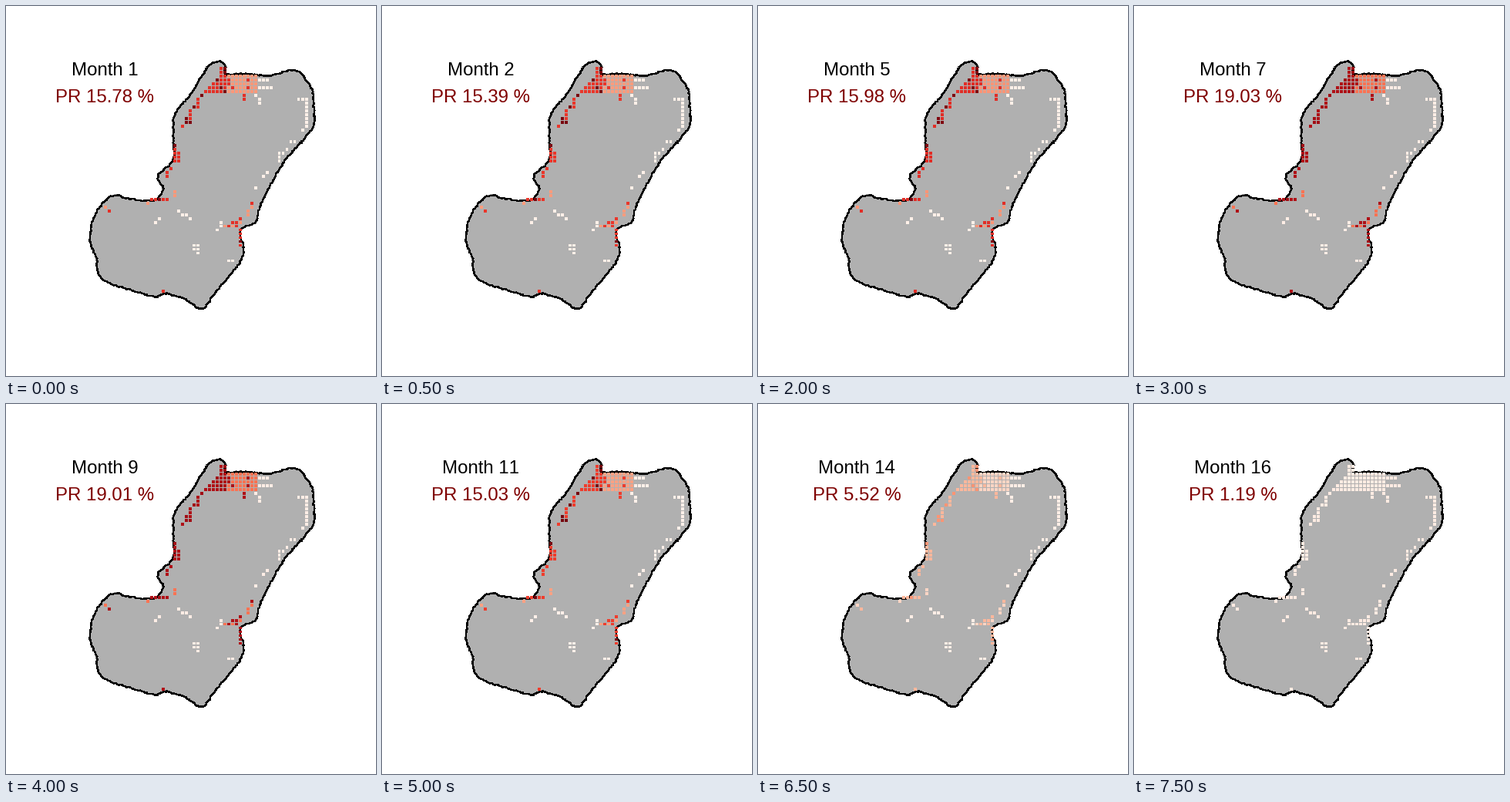
A matplotlib script that plays this animation: 480 px wide and 480 px high, repeating every 8 s.

```python
import numpy as np
import matplotlib.pyplot as plt
from matplotlib.animation import FuncAnimation
from matplotlib.collections import PolyCollection

SIZE, DPI = 480, 100
MONTHS = 16
PX = 72 / DPI  # points per pixel
SEVERE, HIGH, MEDIUM, LOW = range(4)

plt.rcParams["font.family"] = "Liberation Sans"
plt.rcParams["text.kerning_factor"] = 6  # even digit spacing

# Key points of the coast, clockwise from the northern tip
COAST = [(275, 72), (284, 78), (285, 88), (303, 88), (322, 89), (345, 90),
         (372, 83), (386, 91), (397, 109), (399, 130), (399, 154),
         (385, 174), (360, 203), (342, 234), (328, 264), (325, 279),
         (304, 291), (308, 313), (303, 333), (272, 371), (254, 393),
         (232, 380), (207, 373), (194, 377), (166, 370), (124, 354),
         (117, 325), (109, 305), (114, 274), (130, 251), (143, 246),
         (160, 250), (192, 252), (204, 237), (197, 221), (217, 199),
         (217, 168), (219, 140), (240, 114), (262, 79)]

# Inhabited trails on the (column, row) grid
TRAILS = {
    HIGH: [[(25, 7), (23, 10), (20, 15)], [(24, 8), (24, 10)],
           [(22, 11), (22, 14)], [(18, 20), (18, 24)], [(19, 22), (19, 24)],
           [(17, 26), (16, 28)], [(13, 34), (16, 34)], [(32, 41), (35, 39)],
           [(35, 42), (35, 46)]],
    MEDIUM: [[(31, 41), (34, 41)], [(33, 40), (35, 40)], [(11, 35), (12, 34)],
             [(18, 32), (18, 33)], [(36, 7), (36, 8)], [(0, 36), (1, 37)],
             [(38, 35), (37, 38)], [(15, 58)]],
    LOW: [[(40, 3), (42, 3)], [(40, 5), (43, 5)], [(39, 7), (40, 9)],
          [(50, 8), (52, 8), (52, 14), (51, 16)], [(49, 19), (48, 19)],
          [(47, 21), (45, 22), (45, 24)], [(42, 27), (41, 28)], [(39, 31)],
          [(19, 37), (22, 39)], [(13, 40), (14, 39)], [(29, 42), (30, 40)],
          [(23, 46), (23, 47)], [(24, 46), (24, 48)], [(32, 50), (33, 50)]],
}

# Prevalence at key months, and colour-map position of each group by prevalence
KEY_MONTHS = [1, 4, 7, 9, 11, 13, 16]
KEY_RATES = [15.78, 14.65, 19.03, 19.01, 15.03, 11.89, 1.19]
RATE_STOPS = [1.2, 12, 15, 19]
SHADES = {SEVERE: [.06, .83, .97, .88], HIGH: [.06, .57, .62, .84],
          MEDIUM: [.06, .32, .33, .47], LOW: [.06, .02, .03, .05]}

rng = np.random.default_rng(4)


def coastline():
    """Catmull-Rom curve through the key points, roughened."""
    p1 = np.array(COAST, float)
    p0, p2, p3 = (np.roll(p1, -k, axis=0) for k in (-1, 1, 2))
    parts = []
    for a, b, c, d in zip(p0, p1, p2, p3):
        t = np.arange(0, 1, 2 / np.hypot(*(c - b)))[:, None]
        parts.append(b + t / 2 * (c - a + t * (2 * a - 5 * b + 4 * c - d
                                               + t * (3 * b - a - 3 * c + d))))
    line = np.vstack(parts)
    return line + rng.uniform(-0.9, 0.9, line.shape)


def trail_cells(points):
    yield points[0]
    for a, b in zip(np.array(points), np.array(points[1:])):
        n = np.abs(b - a).max()
        for k in range(1, n + 1):
            yield tuple(np.rint(a + (b - a) * k / n).astype(int))


def settle():
    """Map each inhabited cell to its risk group."""
    groups = {}
    for row in range(7):  # dense northern town
        for col in range(min(30, 32 - row), 32 if row < 2 else 40):
            groups[col, row] = HIGH if col < 32 else MEDIUM
    for group, trails in TRAILS.items():
        for trail in trails:
            for cell in trail_cells(trail):
                groups.setdefault(cell, group)
    for cell, group in groups.items():  # some cells fare worse
        if group in (HIGH, MEDIUM) and rng.random() < 0.2:
            groups[cell] = group - 1
    return groups


def square(col, row, side=3.9):
    x, y = 126.6 + 5.02 * col, 79 + 4.99 * row
    return [(x, y), (x + side, y), (x + side, y + side), (x, y + side)]


fig = plt.figure(figsize=(SIZE / DPI, SIZE / DPI), dpi=DPI, facecolor="white")
ax = fig.add_axes([0, 0, 1, 1])
ax.set(xlim=(0, SIZE), ylim=(SIZE, 0))
ax.axis("off")

ax.fill(*coastline().T, facecolor="#b0b0b0", edgecolor="black",
        lw=1.4 * PX, antialiased=False)
groups = settle()
group_of = list(groups.values())
cells = PolyCollection([square(*cell) for cell in groups],
                       edgecolors="none", zorder=3)
ax.add_collection(cells)


def label(y, color):
    return ax.text(128, y, "", color=color, fontsize=24 * PX,
                   ha="center", va="baseline")


month_text = label(90, "black")
rate_text = label(125, "#7f0000")
reds = plt.get_cmap("Reds")


def update(i):
    month = i + 1
    rate = np.exp(np.interp(month, KEY_MONTHS, np.log(KEY_RATES)))
    shade = np.array([np.interp(rate, RATE_STOPS, SHADES[g]) for g in range(4)])
    cells.set_facecolor(reds(shade[group_of]))
    month_text.set_text(f"Month {month}")
    rate_text.set_text(f"PR {rate:.2f} %")
    return cells, month_text, rate_text


anim = FuncAnimation(fig, update, frames=MONTHS, interval=500,
                     repeat=True, repeat_delay=0)
plt.show()
```
